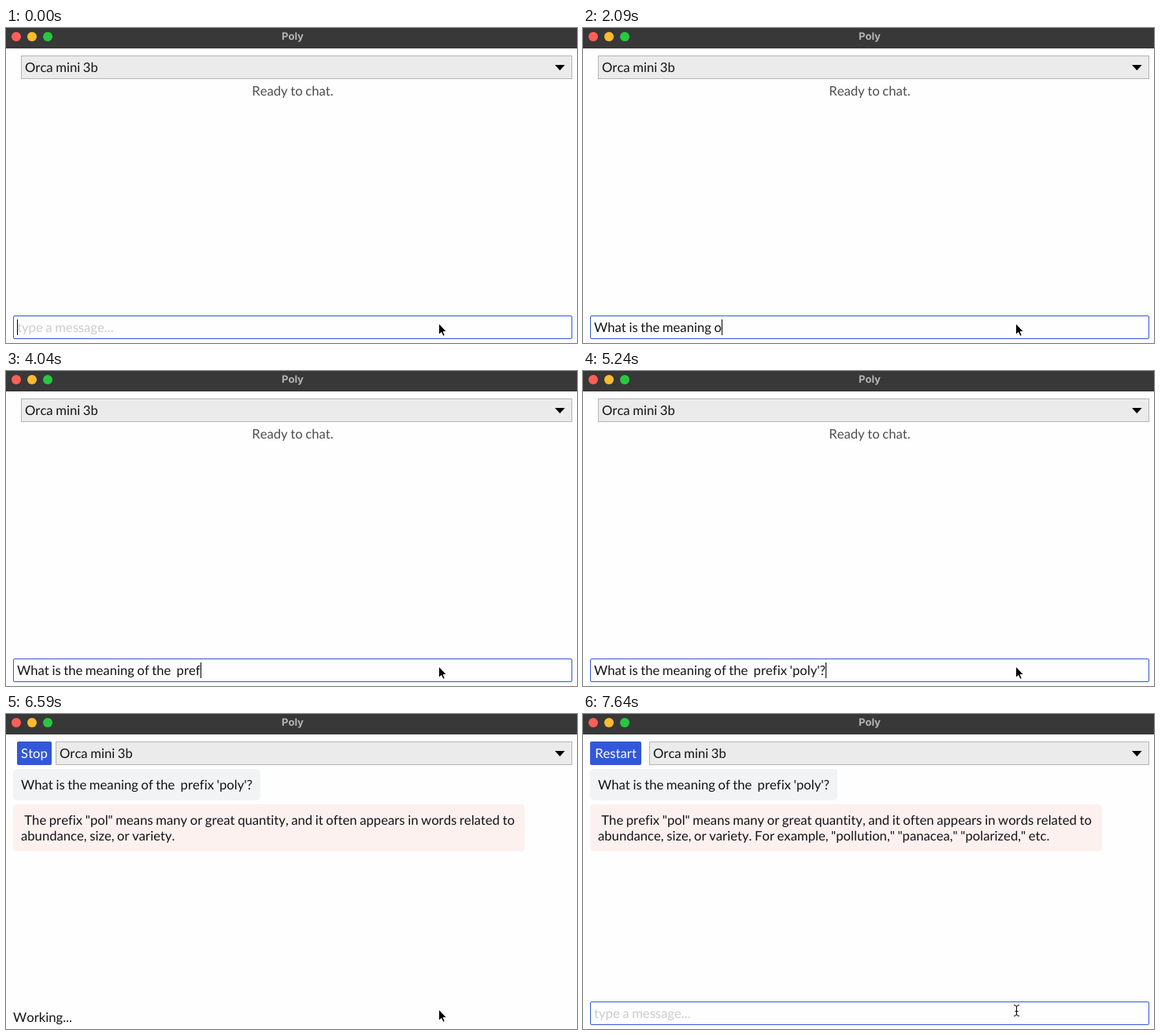
These frames come from a looping animation (725 by 401 pixels, 8 s). An HTML page:

```html
<!DOCTYPE html>
<html lang="en">
<head>
<meta charset="utf-8">
<title>Poly</title>
<style>
  html, body { margin: 0; width: 100%; height: 100%; overflow: hidden; background: #fefefe; }
  body {
    position: relative; color: #141414;
    font: 16.667px/20px Lato, sans-serif; word-spacing: -.04em;
    font-kerning: none; font-variant-ligatures: none;
    text-rendering: geometricPrecision; white-space: pre;
  }
  body * { position: absolute; box-sizing: border-box; }
  span { position: static; }
  #bar { left: 0; top: 0; width: 725px; height: 26px; background: #383838; }
  #bar i { top: 5px; width: 12px; height: 12px; border-radius: 50%; }
  #bar b { left: 0; width: 728px; top: 0; text-align: center; color: #b6b4b4; font: 700 13px/22px Inter, sans-serif; }
  #button { top: 35px; height: 30px; padding: 5px 0; text-align: center; border-radius: 2px; background: #3257d9; color: #fff; }
  #model { top: 35px; right: 0; height: 30px; padding: 4px; border: 1px solid #b5b5b5; background: #ebebeb; }
  #panel { left: 0; top: 0; width: 719px; height: 401px; }
  #status { left: 9px; top: 70px; width: 710px; text-align: center; color: #4d4d4d; }
  .bubble { left: 9px; max-width: 650px; padding: 10px; border-radius: 5px; white-space: pre-wrap; }
  #question { top: 70px; background: #f1f3f5; }
  #reply { top: 115px; background: #fdf1f0; }
  #working { left: 9px; top: 376px; }
  #input { left: 9px; top: 366px; width: 710px; height: 30px; padding: 4px; border: 1px solid #3257d9; border-radius: 2px; background: #fefefe; }
  #caret { width: 1px; height: 20px; background: #000; }
  #hint { color: #ccc; }
  svg { left: 0; top: 0; width: 725px; height: 401px; }
</style>
</head>
<body>
<div id="bar"><i style="left:7px;background:#ff5f57"></i><i style="left:27px;background:#febc2e"></i><i style="left:47px;background:#28c840"></i><b>Poly</b></div>
<div id="panel"><div id="button"></div><div id="model">Orca mini 3b</div></div>
<div id="status">Ready to chat.</div>
<div id="question" class="bubble"></div>
<div id="reply" class="bubble"></div>
<div id="working">Working...</div>
<div id="input"><span id="typed"></span><i id="caret"></i><span id="hint">type a message...</span></div>
<svg viewBox="0 0 725 401">
  <path d="M697 47H709.6L703.3 54Z"/>
  <path id="arrow" d="M549.5 376V390.5L552.8 387.5L555 392.3L557.3 391.3L555.2 386.6H559.5Z" stroke="#fff"/>
  <path id="beam" d="M547 370.5Q550.5 370.5 550.5 373V382Q550.5 384.5 547 384.5M554 370.5Q550.5 370.5 550.5 373M554 384.5Q550.5 384.5 550.5 382M548.5 378.5H552.5" fill="none" stroke="#000"/>
</svg>
<script>
const LOOP = 8000, STEP = 150, RETYPE = 3590, SEND = 5540, REPLY = 5840, DONE = 7190, BLINK = 7640;
const slip = "What is the meaning of th ew";
const prompt = "What is the meaning of the  prefix 'poly'?";
const chunks = [' The prefix', ' "pol" means many', ' or great quantity,', ' and it often appears',
  ' in words related to', ' abundance, size, or variety.', ' For example, "poll', 'ution," "panacea,"', ' "polarized," etc.'];
// Bursts of typing: start time, then the draft length after each step
const bursts = [
  [300, 1, 3, 4, 6, 8, 9, 12],
  [1350, 14, 16, 17],
  [1790, 19],
  [2090, 21, 23, 24, 25, 27, 28],
  [3140, 27, 26, 25, 26, 28, 30, 32],
  [4190, 33, 34, 35, 36, 37, 39, 41],
  [5240, 42]
];
const $ = id => document.getElementById(id);
const show = (id, on) => { $(id).style.display = on ? '' : 'none'; };
const steps = (t, start) => Math.floor((t - start) / STEP) + 1;

function draftAt(t) {
  if (t >= SEND) return '';
  const burst = bursts.findLast(([start]) => t >= start);
  if (!burst) return '';
  const [start, ...lengths] = burst;
  const length = lengths[Math.min(steps(t, start), lengths.length) - 1];
  return (t < RETYPE ? slip : prompt).slice(0, length);
}

function render(t) {
  const sent = t >= SEND, done = t >= DONE, busy = sent && !done;
  const draft = draftAt(t);
  $('typed').textContent = draft;
  show('hint', !draft);
  show('caret', t < BLINK);
  show('input', !busy);
  show('working', busy);
  show('status', !sent);
  show('question', sent);
  show('reply', t >= REPLY);
  $('reply').textContent = chunks.slice(0, Math.max(0, steps(t, REPLY))).join('');
  show('button', sent);
  $('button').textContent = done ? 'Restart' : 'Stop';
  $('button').style.left = done ? '9px' : '14px';
  $('button').style.width = done ? '65px' : '44px';
  $('model').style.left = done ? '84px' : busy ? '63px' : '19px';
  show('arrow', !done);
  show('beam', done);
}

$('question').textContent = prompt;
const origin = performance.now();
function tick() {
  render((performance.now() - origin) % LOOP);
  requestAnimationFrame(tick);
}
tick();
</script>
</body>
</html>
```
